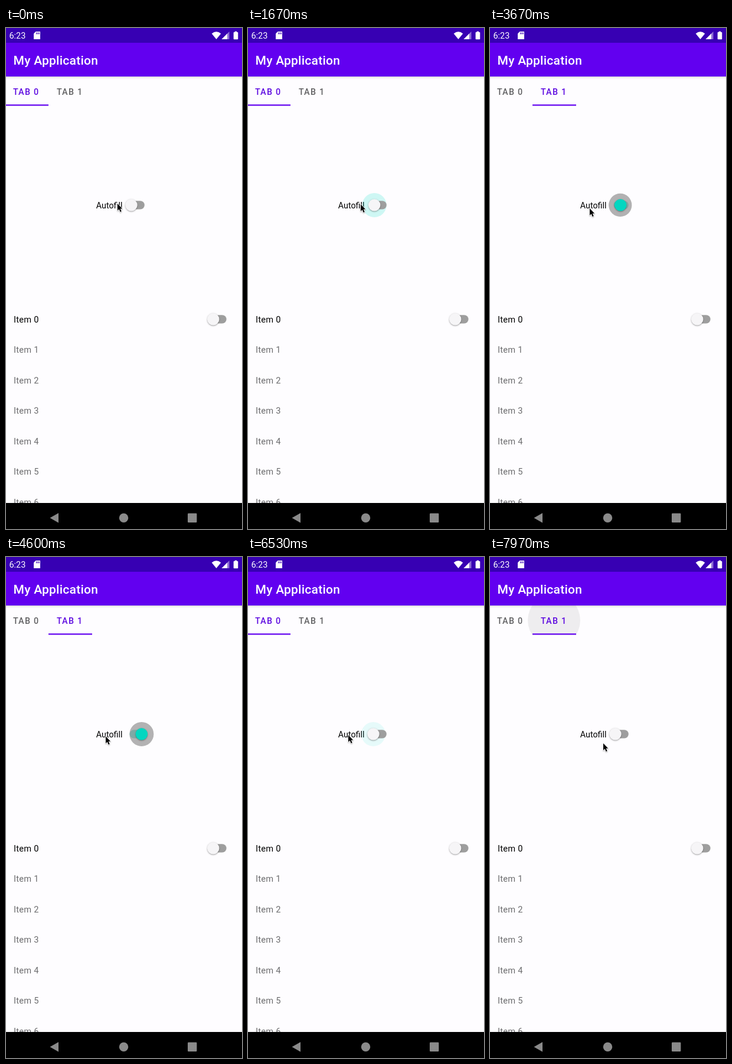
These frames come from a looping animation (400 px wide and 847 px high, 8000 ms). An HTML page with a canvas:

```html
<!DOCTYPE html>
<html lang="en">
<head>
<meta charset="utf-8">
<title>Tabs and switches</title>
<style>
html, body { margin: 0; width: 100%; height: 100%; overflow: hidden; background: #fefdff; }
canvas { display: block; width: 400px; height: 847px; }
</style>
</head>
<body>
<canvas id="stage"></canvas>
<script>
const W = 400, H = 847, LOOP = 8000;
const BG = '#fefdff', PURPLE = '#6200f0', TEAL = '#03d6c0', GREY = '#9e9e9e';
const canvas = document.getElementById('stage');
const ctx = canvas.getContext('2d');
const dpr = window.devicePixelRatio || 1;
canvas.width = W * dpr;
canvas.height = H * dpr;

const toggles = [150, 550, 1000, 1470, 1920, 2400, 3553, 3990, 4400, 4780, 5850, 6240, 6700, 7130];
const slides = [{ at: 2850, to: 1 }, { at: 5138, to: 0 }, { at: 7560, to: 1 }];
const SLIDE_MS = 400;

// Time, x, y of the pointer tip
const pointerPath = [
  [0, 189, 297], [1670, 191, 298], [2330, 191, 298], [2470, 175, 268],
  [2680, 95, 108], [2800, 95, 108], [3180, 167, 302], [3670, 169, 305],
  [4700, 169, 303], [4950, 30, 108], [5090, 30, 108], [5360, 165, 310],
  [5430, 168, 317], [5520, 168, 324], [5720, 170, 303], [6530, 170, 301],
  [7150, 172, 302], [7400, 95, 108], [7540, 95, 108], [7850, 188, 310], [7970, 192, 315]
];

const clamp = v => Math.min(1, Math.max(0, v));
const lerp = (a, b, k) => a + (b - a) * k;
const smooth = k => (1 - Math.cos(Math.PI * clamp(k))) / 2;
const lastBefore = (list, t, time) => list.reduce((n, item, i) => time(item) <= t ? i : n, -1);

function text(str, x, y, size, color, weight = 400, spacing = 0) {
  ctx.font = `${weight} ${size}px Roboto, sans-serif`;
  ctx.letterSpacing = spacing + 'px';
  ctx.fillStyle = color;
  ctx.fillText(str, x, y);
}

function rect(x, y, w, h, color) {
  ctx.fillStyle = color;
  ctx.fillRect(x, y, w, h);
}

function roundRect(x, y, w, h, r, color) {
  ctx.fillStyle = color;
  ctx.beginPath();
  ctx.roundRect(x, y, w, h, r);
  ctx.fill();
}

function circle(x, y, r, color) {
  ctx.fillStyle = color;
  ctx.beginPath();
  ctx.arc(x, y, r, 0, Math.PI * 2);
  ctx.fill();
}

function trace(points) {
  ctx.beginPath();
  points.forEach(([x, y]) => ctx.lineTo(x, y));
  ctx.closePath();
}

function polygon(points, color) {
  trace(points);
  ctx.fillStyle = color;
  ctx.fill();
}

function clipped(x, y, w, h, draw) {
  ctx.save();
  ctx.beginPath();
  ctx.rect(x, y, w, h);
  ctx.clip();
  draw();
  ctx.restore();
}

function statusBar() {
  rect(0, 0, W, 25, '#3700b3');
  text('6:23', 5.5, 18, 14.4, '#fff');
  polygon([[47, 9.5], [50.5, 6], [58, 6], [58, 19], [47, 19]], '#fff');
  [51, 53.3, 55.6].forEach(x => rect(x, 7.5, 1.2, 3, '#3700b3'));

  ctx.fillStyle = '#fff';
  ctx.beginPath();
  ctx.moveTo(356.5, 19);
  ctx.lineTo(348.7, 9.4);
  ctx.quadraticCurveTo(356.5, 3, 364.3, 9.4);
  ctx.fill();

  polygon([[365.5, 19], [378.5, 6], [378.5, 19]], 'rgba(255,255,255,.45)');
  polygon([[365.5, 19], [375, 9.5], [375, 19]], '#fff');
  roundRect(385.7, 7, 7.6, 12.3, 1, '#fff');
  rect(387.7, 5.7, 3.6, 2, '#fff');
}

function appBar() {
  rect(0, 25, W, 57, PURPLE);
  const shade = ctx.createLinearGradient(0, 82, 0, 86);
  shade.addColorStop(0, 'rgba(0,0,0,.13)');
  shade.addColorStop(1, 'rgba(0,0,0,0)');
  rect(0, 82, W, 4, shade);
  text('My Application', 12.6, 62, 21, '#fff', 500, 0.25);
}

// Page scroll and both ends of the indicator, each with its own settling speed
function tabState(t) {
  const i = lastBefore(slides, t, s => s.at);
  if (i < 0) return { tab: 0, page: 0, left: 0, right: 72 };
  const { at, to } = slides[i];
  const rest = 1 - clamp((t - at) / SLIDE_MS);
  const pos = power => to ? 1 - rest ** power : rest ** power;
  return {
    tab: to,
    page: pos(5),
    left: lerp(0, 72, pos(to ? 2.4 : 3.2)),
    right: lerp(72, 146, pos(to ? 3.2 : 2.4))
  };
}

function tabRipple(t) {
  for (const { at, to } of slides) {
    const age = t - at;
    if (age < -60 || age > 500) continue;
    const r = 44.5 * smooth((age + 60) / 225);
    const alpha = 0.145 * (1 - clamp((age - 300) / 200));
    circle(to ? 108.5 : 35, 107, r, `rgba(0,0,0,${alpha})`);
  }
}

function tabs(t, state) {
  clipped(0, 82, W, 49.5, () => tabRipple(t));
  ['TAB 0', 'TAB 1'].forEach((label, i) =>
    text(label, i ? 86 : 12, 112.6, 14.3, i === state.tab ? '#5c08e0' : '#5f5f61', 500, 1.27));
  rect(state.left, 129.3, state.right - state.left, 2.2, PURPLE);
}

function switchState(t) {
  const i = lastBefore(toggles, t, at => at);
  const on = i >= 0 && i % 2 === 0;
  const k = i < 0 ? 1 : smooth((t - toggles[i]) / 250);
  return { on, pos: on ? k : 1 - k, ripple: switchRipple(t) };
}

function switchRipple(t) {
  const PRESS = 90;
  const i = lastBefore(toggles, t, at => at - PRESS);
  if (i < 0) return null;
  const age = t - toggles[i];
  const fade = 1 - clamp((age - 200) / 180);
  if (!fade) return null;
  return { grow: smooth((age + PRESS) / 240), fade, teal: i % 2 === 1 };
}

function drawSwitch(x, y, { on, pos, ripple }) {
  const thumb = x + 19.2 * pos;
  const drawRipple = () => {
    const { grow, fade, teal } = ripple;
    const color = teal ? `rgba(3,218,197,${0.19 * fade})` : `rgba(0,0,0,${0.3 * fade})`;
    circle(lerp(x, thumb, grow), y, 20.5 * grow, color);
  };
  if (ripple && ripple.teal) drawRipple();
  roundRect(x - 2.8, y - 7.2, 25.2, 14.4, 7.2, on ? '#b3f1ea' : GREY);
  if (ripple && !ripple.teal) drawRipple();
  ctx.save();
  ctx.shadowColor = 'rgba(0,0,0,.38)';
  ctx.shadowBlur = 2.2 * dpr;
  ctx.shadowOffsetY = 0.9 * dpr;
  circle(thumb, y, 10.2, on ? TEAL : '#f6f5f7');
  ctx.restore();
}

const OFF = { on: false, pos: 0, ripple: null };

function pager(t, { tab, page }) {
  const live = switchState(t);
  clipped(0, 132, W, 330, () => {
    [0, 1].forEach(i => {
      const dx = (i - page) * W;
      if (Math.abs(dx) >= W) return;
      text('Autofill', 152.8 + dx, 305, 14.3, '#000');
      drawSwitch(212.4 + dx, 299.4, i === tab ? live : OFF);
    });
  });
}

function itemList() {
  clipped(0, 462, W, 341, () => {
    text('Item 0', 13, 498, 14.6, '#000', 400, 0.25);
    drawSwitch(351.2, 492.4, OFF);
    for (let i = 1; i < 7; i++)
      text('Item ' + i, 13, 549 + 51.5 * (i - 1), 14.6, '#6c6c6e', 400, 0.25);
  });
}

function navBar() {
  const color = '#8a8a8a';
  rect(0, 803, W, 44, '#000');
  polygon([[74.5, 828.3], [89, 820], [89, 836.6]], color);
  circle(199.5, 828.2, 7.7, color);
  roundRect(308, 820.6, 15.4, 15.4, 1.2, color);
}

function pointer(t) {
  const i = lastBefore(pointerPath, t, p => p[0]);
  const [t0, x0, y0] = pointerPath[i];
  const [t1, x1, y1] = pointerPath[i + 1] || [LOOP, x0, y0];
  const k = (t - t0) / (t1 - t0);
  ctx.save();
  ctx.translate(lerp(x0, x1, k), lerp(y0, y1, k));
  trace([[0, 0], [0, 11.8], [2.7, 9.3], [4.7, 14], [6.7, 13.1], [4.7, 8.6], [8.2, 8.5]]);
  ctx.shadowColor = 'rgba(0,0,0,.3)';
  ctx.shadowBlur = 2 * dpr;
  ctx.shadowOffsetY = dpr;
  ctx.strokeStyle = '#fff';
  ctx.lineWidth = 1.6;
  ctx.lineJoin = 'round';
  ctx.stroke();
  ctx.shadowColor = 'transparent';
  ctx.fillStyle = '#000';
  ctx.fill();
  ctx.restore();
}

function frame(now) {
  const t = now % LOOP;
  const state = tabState(t);
  ctx.setTransform(dpr, 0, 0, dpr, 0, 0);
  rect(0, 0, W, H, BG);
  pager(t, state);
  itemList();
  tabs(t, state);
  appBar();
  statusBar();
  navBar();
  pointer(t);
  requestAnimationFrame(frame);
}

const start = performance.now();
frame(0);
function loop() { frame(performance.now() - start); }
</script>
</body>
</html>
```
